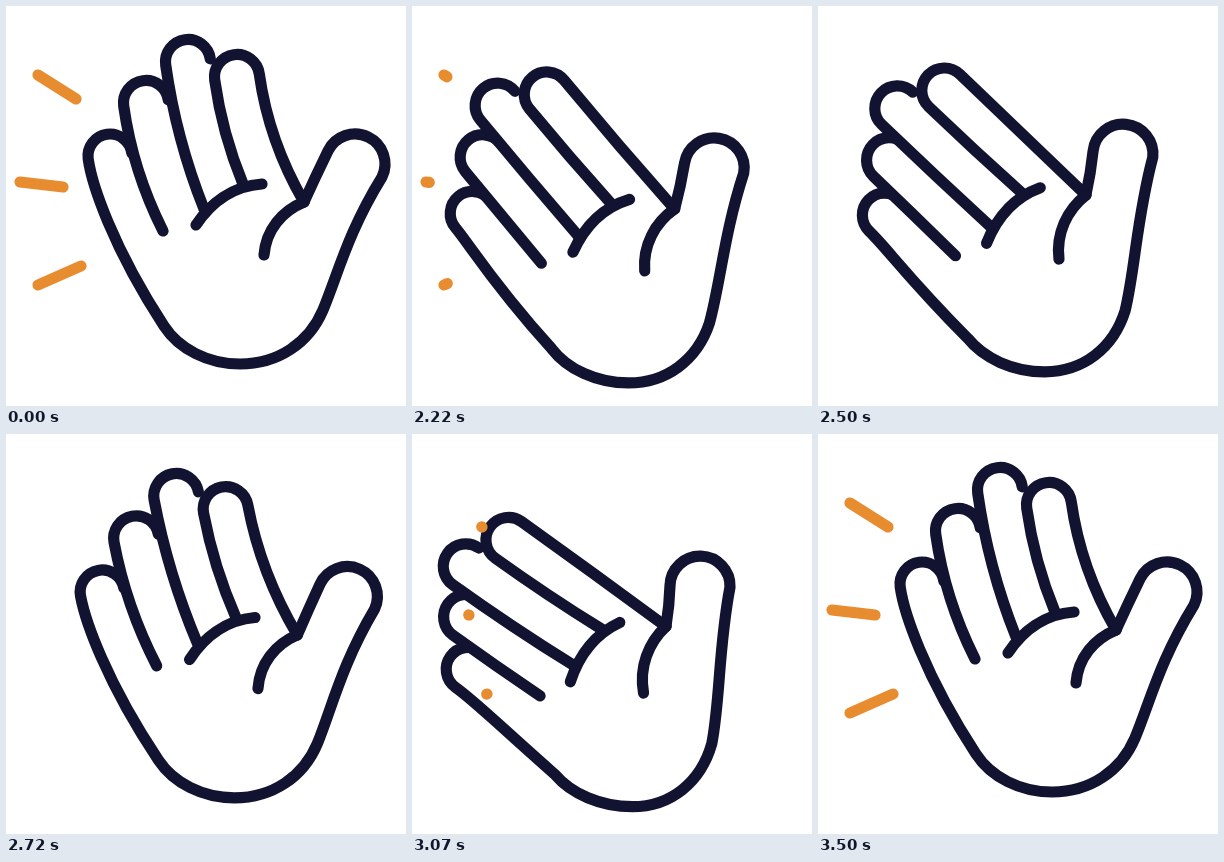
Animation of 400 by 400 pixels, one loop 3520 ms. Source, as an HTML page with a canvas:

```html
<!DOCTYPE html>
<html lang="en">
<head>
<meta charset="utf-8">
<title>Waving hand</title>
<style>
  html, body { margin: 0; width: 100%; height: 100%; overflow: hidden; background: #fff; }
  canvas { display: block; width: 100vw; height: 100vh; object-fit: contain; }
</style>
</head>
<body>
<canvas id="stage" width="400" height="400"></canvas>
<script>
const ctx = document.getElementById('stage').getContext('2d');
const LOOP = 3520;
const WAVE_START = 2000;
const BEND_LAG = 65;
const INK = '#121331';
const ACCENT = '#e88c30';

const RADIUS = 22.5;
const THUMB_RADIUS = 30;
const CROTCH = [298, 196];

// Root and tip centre at rest; lean and rise move the tip as the hand bends.
const pinky = { tip: [104, 150], lean: 6, rise: 10, sag: 22 };
const ring = { root: [157, 225], tip: [140, 97], lean: 20, rise: 21, sag: 22 };
const middle = { root: [198, 203], tip: [182, 56], lean: 34, rise: 33, sag: 22 };
const index = { root: [237, 178], tip: [231, 71], lean: 33, rise: 43, sag: 22 };
const thumb = { tip: [349, 158], lean: 5, rise: -16, sag: 0 };

// Outer end, inner end.
const rays = [[32, 69, 70, 93], [14, 176, 57, 181], [32, 279, 75, 260]];

const clamp = x => Math.min(1, Math.max(0, x));
const smooth = x => x * x * (3 - 2 * x);
const mix = (a, b, k) => a + (b - a) * k;
const radians = degrees => degrees * Math.PI / 180;

// Out, back, out again, then a softer return to rest.
function swing(elapsed) {
  const beat = 310, settle = 450;
  if (elapsed <= 0) return 0;
  if (elapsed < 3 * beat) return smooth(Math.abs((elapsed / beat + 1) % 2 - 1));
  return 1 - smooth(clamp((elapsed - 3 * beat) / settle) ** .75);
}

// Curls the plane to the left around the base of the palm.
function pose([x, y], bend) {
  const curve = .00204 * Math.max(bend, 1e-4), axis = 233, base = 358;
  const angle = curve * (base - y), side = x - axis;
  const c = Math.cos(angle), s = Math.sin(angle);
  return [axis - (1 - c) / curve + side * c, base - s / curve - side * s];
}

// A round tip: its centre, tilt and the two points where the sides begin.
function cap({ tip, lean, rise, sag }, radius, tilt, bend) {
  const give = 1.3 * bend - .3 * bend * bend;
  const [x, y] = pose([tip[0] - lean * give, tip[1] - rise * bend + sag * bend * bend], bend);
  const c = Math.cos(tilt), s = Math.sin(tilt);
  return {
    left: [x - radius * c, y - radius * s],
    right: [x + radius * c, y + radius * s],
    back: ([px, py], d) => [px - d * s, py + d * c],
    trace: reverse => reverse
      ? ctx.arc(x, y, radius, tilt, tilt + Math.PI, true)
      : ctx.arc(x, y, radius, tilt + Math.PI, tilt)
  };
}

// Control point for a side that leaves the cap along the finger.
function sideControl(shape, from, root) {
  return shape.back(from, Math.hypot(from[0] - root[0], from[1] - root[1]) / 2);
}

function drawPalm(bend, fingerTilt, thumbTilt) {
  const at = (x, y) => pose([x, y], bend);
  const small = cap(pinky, RADIUS - .5, fingerTilt, bend);
  const large = cap(thumb, THUMB_RADIUS, thumbTilt, bend);
  const crotch = at(...CROTCH);
  ctx.beginPath();
  small.trace(true);
  ctx.bezierCurveTo(...small.back(small.left, 25), ...at(106, 240), ...at(158, 320));
  ctx.bezierCurveTo(...at(173, 343), ...at(202, 358), ...at(234, 358));
  ctx.bezierCurveTo(...at(272, 358), ...at(303, 337), ...at(317, 304));
  ctx.bezierCurveTo(...at(332, 268), ...at(342, 226), ...large.right);
  large.trace(true);
  ctx.quadraticCurveTo(...sideControl(large, large.left, crotch), ...crotch);
  ctx.stroke();
}

// The white fill hides the neighbour's cap where it reaches behind.
function drawFinger(finger, bend, tilt, end) {
  const shape = cap(finger, RADIUS, tilt, bend);
  const root = pose(finger.root, bend);
  ctx.beginPath();
  ctx.moveTo(...root);
  ctx.quadraticCurveTo(...sideControl(shape, shape.left, root), ...shape.left);
  shape.trace(false);
  if (end) {
    const foot = pose(end, bend);
    ctx.quadraticCurveTo(...sideControl(shape, shape.right, foot), ...foot);
  }
  ctx.fill();
  ctx.stroke();
}

function drawCreases(bend) {
  const at = (x, y) => pose([x, y], bend);
  ctx.beginPath();
  ctx.moveTo(...at(190, 219));
  ctx.bezierCurveTo(...at(204, 198), ...at(226, 180), ...at(256, 178));
  ctx.moveTo(...at(...CROTCH));
  ctx.bezierCurveTo(...at(276, 205), ...at(260, 224), ...at(258, 249));
  ctx.stroke();
}

function drawHand(t) {
  const shift = swing(t - WAVE_START);
  const bend = 1.22 * swing(t - WAVE_START - BEND_LAG);
  const give = 1.3 * bend - .3 * bend * bend;
  const tilt = radians(-8 - 46 * give);
  ctx.save();
  ctx.translate(-22 * shift, 23.7 * shift);
  ctx.strokeStyle = INK;
  ctx.fillStyle = '#fff';
  drawPalm(bend, tilt, radians(26 - 24 * give));
  drawFinger(ring, bend, tilt);
  drawFinger(middle, bend, tilt);
  drawFinger(index, bend, tilt, CROTCH);
  drawCreases(bend);
  ctx.restore();
}

function drawRays(t) {
  const out = clamp((t - WAVE_START) / 250);
  const leaving = t < 2600;
  const length = leaving ? 1 - (out + smooth(out)) / 2 : smooth(clamp((t - 3050) / 450));
  if (length <= 0) return;
  const a = leaving ? 0 : 1 - length, b = leaving ? length : 1;
  ctx.strokeStyle = ACCENT;
  ctx.beginPath();
  for (const [x0, y0, x1, y1] of rays) {
    ctx.moveTo(mix(x0, x1, a), mix(y0, y1, a));
    ctx.lineTo(mix(x0, x1, b), mix(y0, y1, b));
  }
  ctx.stroke();
}

function draw(t) {
  ctx.fillStyle = '#fff';
  ctx.fillRect(0, 0, 400, 400);
  ctx.lineWidth = 11.2;
  ctx.lineCap = ctx.lineJoin = 'round';
  drawHand(t);
  drawRays(t);
}

const start = performance.now();
function tick() {
  draw((performance.now() - start) % LOOP);
  requestAnimationFrame(tick);
}
tick();
</script>
</body>
</html>
```
